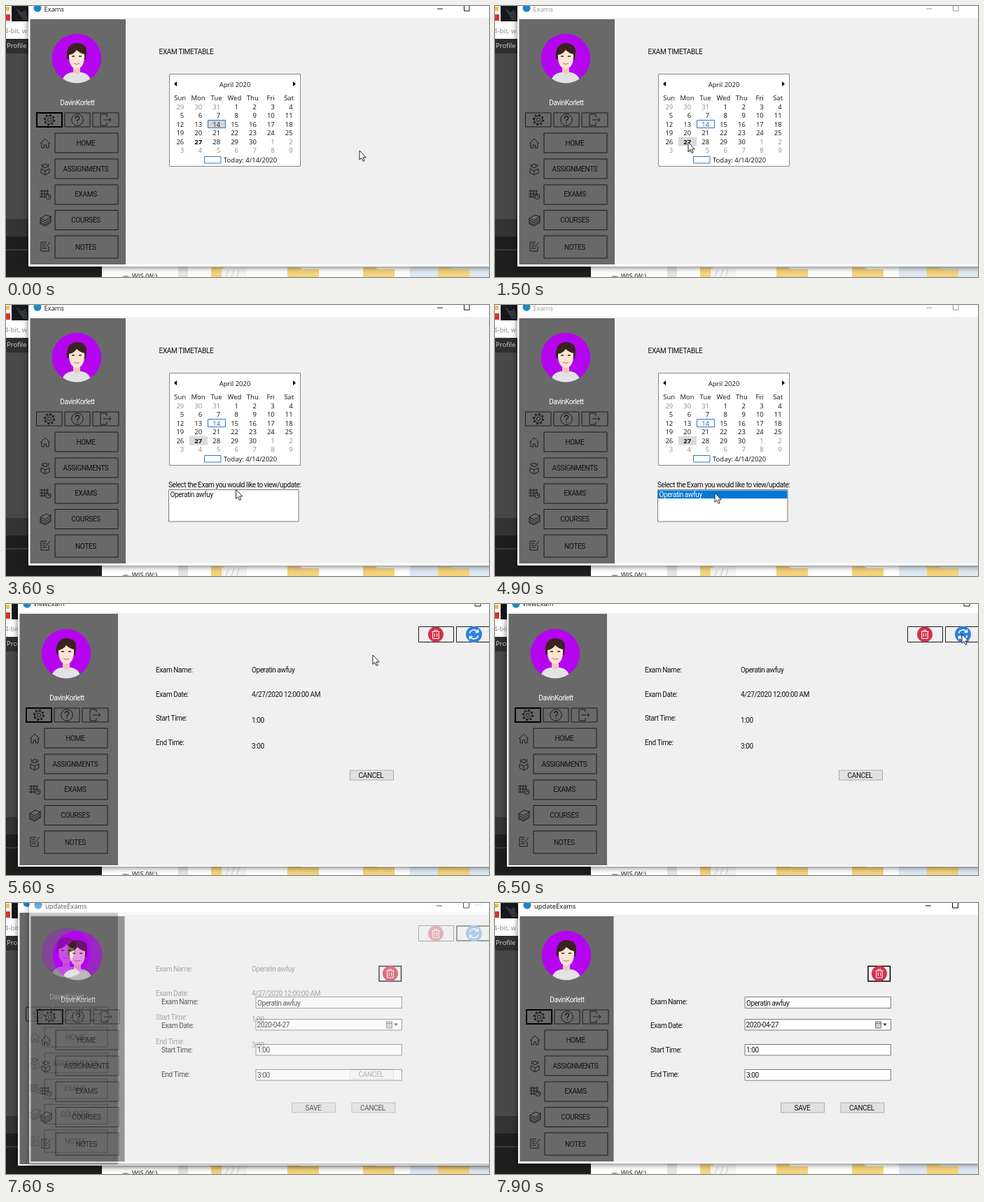
An HTML page that plays this animation: 690 by 388 pixels, repeating every 8 s.

```html
<!DOCTYPE html>
<html lang="en">
<head>
<meta charset="utf-8">
<title>Exam timetable</title>
<style>
  html, body { margin: 0; width: 100%; height: 100%; overflow: hidden; background: #1e1e1e; }
  svg { display: block; width: 100vw; height: 100vh; }
  text { font: 10px Roboto, sans-serif; letter-spacing: -.4px; fill: #111; }
  .ui, .ui text { font: 9.5px "Open Sans", sans-serif; letter-spacing: 0; }
  .caps, .caps text { letter-spacing: -.3px; }
  .mid, .mid text { text-anchor: middle; }
  .line { fill: none; stroke: #1b1b1b; }
  .focus { fill: none; stroke: #000; stroke-width: 2; }
  .button { fill: #e1e1e1; stroke: #adadad; }
  .field { fill: #fff; stroke: #7a7a7a; }
  .blue { fill: none; stroke: #2478c8; }
  .title text { fill: currentColor; font-size: 9.4px; }
  .title path { fill: none; stroke: currentColor; }
  .window { filter: drop-shadow(0 1px 4px #0009); }
</style>
</head>
<body>
<svg viewBox="0 0 690 388" preserveAspectRatio="none">
  <defs>
    <clipPath id="disc"><circle cx="101" cy="75" r="35.5"/></clipPath>
    <path id="folder" d="M0 1h17l4 3h24v12H0z" fill="#f4d37c"/>
    <g id="bin">
      <circle r="11" fill="#d5304b"/>
      <path d="M-5.5 -4h11M-2 -4v-2h4v2M-4.3 -4v10h8.6v-10M-1.7 -1.5v5M1.7 -1.5v5" fill="none" stroke="#fff"/>
    </g>

    <g id="sidebar">
      <g clip-path="url(#disc)">
        <circle cx="101" cy="75" r="35.5" fill="#b505f0"/>
        <path d="M80 112q0-15 14-17h14q13 2 14 17z" fill="#e2e3e4"/>
        <path d="M96 84h10v11q-5 5-10 0z" fill="#efc9b3"/>
        <path d="M87 76q-2-21 13-23q16 0 15 14l-1 10z" fill="#3b2220"/>
        <path d="M90 70q7-1 11-7q5 5 11 6v5q-1 15-11 16q-10-1-11-16z" fill="#fbe4d3"/>
        <path d="M94 72h4M104 72h4" stroke="#3b2220" stroke-width="1.5"/>
        <path d="M97 82q4 3 8 0" fill="none" stroke="#c4605c"/>
      </g>
      <text class="mid" x="102" y="141.5" style="fill:#fff">DavinKorlett</text>
      <g class="line">
        <path d="M43.5 153h36.5v20h-36.5zM84 153h36v20h-36zM124 153h37v20h-37z"/>
        <circle cx="62" cy="163" r="2.6"/><circle cx="62" cy="163" r="5.6"/>
        <circle cx="62" cy="163" r="7.2" stroke-width="2" stroke-dasharray="2.8 2.85"/>
        <circle cx="102" cy="163" r="8.3"/>
        <path d="M99.3 161q0-3 2.7-3t2.7 2.6q0 1.6-2.7 3v1.4M102 166.5v1.5" stroke-width="1.3"/>
        <path d="M144 159v-4h-9v16h9v-4M139 163h11M147 160l3 3l-3 3"/>
        <path d="M49 197l7-7l7 7M51 196v7h3.500v-4h3v4h3.500v-7"/>
        <circle cx="56" cy="229" r="2.8"/>
        <path d="M50 233l6 3l6-3v6l-6 3l-6-3zM56 236v6M52 231q-2-4 0-5M60 231q2-4 0-5"/>
        <path d="M48 265h13M48 269h13M48 273h8M51 263v12M55 263v12M59 263v6"/>
        <circle cx="60.500" cy="273" r="3.500"/><path d="M60.500 271v2h2"/>
        <path d="M49 304l8-5l7 3l-8 5zv3l7 3l8-5M49 307v3l7 3l8-5M49 310v2l7 3l8-5v-10"/>
        <path d="M61 344v7H50v-13h8M52 341h5M52 344h4M52 347h6M57 345l6-7"/>
        <path d="M70 182h90v28H70zM70 219h90v28H70zM70 256h90v28H70zM70 292.500h90v28H70zM70 329h90v32H70z"/>
      </g>
      <g class="mid caps">
        <text x="114" y="199.500">HOME</text><text x="114" y="236.500">ASSIGNMENTS</text>
        <text x="114" y="273">EXAMS</text><text x="114" y="310">COURSES</text>
        <text x="114" y="348.500">NOTES</text>
      </g>
    </g>
  </defs>

  <!-- desktop behind the windows -->
  <rect width="690" height="388" fill="#1e1e1e"/>
  <path d="M0 0h34v47H0z" fill="#fff"/>
  <path d="M8 0h26v22H8z" fill="#16181c"/><path d="M14 3l8 6l6-4l4 15h-8z" fill="#34383f"/>
  <path d="M0 1h5v6H0z" fill="#f2c14a"/><path d="M0 12h6v9H0z" fill="#d8342c"/>
  <path d="M0 47h34v21H0z" fill="#2f2f2f"/><path d="M0 68h34v237H0z" fill="#484848"/>
  <path d="M0 305h34v25H0z" fill="#333"/><path d="M0 348h137v2H0z" fill="#3a3a3a"/>
  <g class="ui">
    <text x="-2" y="38.500" style="fill:#8a8a8a">4-bit, w</text>
    <text x="1" y="60" style="fill:#d8d8d8">Profile</text>
    <path d="M137 370h553v18H137z" fill="#fff"/><path d="M246 370h14v18h-14z" fill="#e3e3e3"/>
    <path d="M577 372h113v16H577z" fill="#dce8f2"/>
    <path d="M165 388q6-4 12 0z" fill="#999"/><text x="180" y="389.500">WIS (W:)</text>
  </g>
  <use href="#folder" x="293" y="373"/><use href="#folder" x="402" y="373"/>
  <use href="#folder" x="510" y="373"/><use href="#folder" x="617" y="373"/>
  <path d="M308 376l36-2v14h-36z" fill="#f4f4f4"/>
  <path d="M314 388l4-10M322 388l4-11M330 388l3-11" stroke="#c9c9c9"/>

  <g id="exams">
    <g class="window">
      <path d="M32 -9h670v382H32z" fill="#fff"/><path d="M34 17h660v353H34z" fill="#f0f0f0"/>
    </g>
    <path d="M34.500 19h136.500v351H34.500z" fill="#696969"/>
    <circle cx="45" cy="3" r="5.500" fill="#1c86c8"/>
    <g class="title ui" id="examsTitle">
      <text x="54.500" y="7.500">Exams</text><path d="M616 4h8M654.500 -1h7.500v8h-7.500z"/>
    </g>
    <use href="#sidebar"/>
    <path id="examsFocus" class="focus" d="M44 153h36v20H44z"/>
    <text class="caps" x="218.500" y="69">EXAM TIMETABLE</text>

    <g class="ui">
      <path d="M233.500 97.500h187v132h-187z" fill="#fff" stroke="#888"/>
      <path d="M244 108v7l-4-3.500zM410 108v7l4-3.500z"/>
      <text class="mid" x="327" y="115.500">April 2020</text>
      <path id="picked" d="M262 188h26v12.500h-26z" fill="#d9d9d9"/>
      <path id="today" class="blue" d="M288.500 163.500h25v11h-25z"/>
      <g id="days"></g>
      <path class="blue" d="M283.500 215.500h23.500v9.500h-23.500z"/>
      <text x="311" y="223.500">Today: 4/14/2020</text>
    </g>

    <g id="list">
      <text x="232" y="260.500">Select the Exam you would like to view/update:</text>
      <path class="field" d="M232.500 264.500h185.500v45.500h-185.500z"/>
      <path id="row" d="M233 265.500h184.500v11.500h-184.500z" fill="#0078d7"/>
      <text id="item" x="234.500" y="275">Operatin awfuy</text>
    </g>

    <g id="dialog" class="ui">
      <path class="window" d="M213 148h335v118H213z" fill="#fff"/>
      <path d="M213 232h335v34H213z" fill="#f0f0f0"/>
      <path d="M213.500 148.500h334v117h-334z" fill="none" stroke="#aaa"/>
      <text x="220" y="164.500" style="font-size:9.200px">Exam Appointment</text>
      <g style="--s:9px" id="message">
        <text x="222" y="201">You already have exams on this date. To add another exam, select No. To</text>
        <text x="222" y="211.500">view the exam/s process Yes.</text>
      </g>
      <path d="M340.500 239.500h59v17h-59z" fill="#cce4f7" stroke="#0078d7"/>
      <path class="button" d="M408.500 239.500h59v17h-59zM475.500 239.500h59v17h-59z"/>
      <g class="mid"><text x="370" y="252">Yes</text><text x="438" y="252">No</text><text x="505" y="252">Cancel</text></g>
    </g>
  </g>

  <g id="view">
    <g class="window">
      <path d="M17 -9h690v385H17z" fill="#fff"/><path d="M19 13h680v361H19z" fill="#f0f0f0"/>
    </g>
    <path d="M19.500 14h140.500v360H19.500z" fill="#696969"/>
    <circle cx="30" cy="0" r="5.500" fill="#1c86c8"/>
    <g class="title ui" id="viewTitle">
      <text x="39" y="3">ViewExam</text><path d="M670 -5h8v8h-8z"/>
    </g>
    <use href="#sidebar" x="-15" y="-4"/>
    <path id="viewFocus" class="focus" d="M29 149h36v20H29z"/>
    <path class="line" d="M589.500 32.500h50v22h-50zM643.500 32.500h50v22h-50z"/>
    <path id="refreshFocus" class="focus" d="M644 33h50v21h-50z"/>
    <use href="#bin" x="614" y="43.500"/>
    <circle cx="668.500" cy="43.500" r="11.500" fill="#2f80e2"/>
    <path d="M662.500 42a6 6 0 0 1 11-2M674.500 45a6 6 0 0 1-11 2M674.500 36.500v4h-4M662.500 50.500v-4h4" fill="none" stroke="#fff" stroke-width="1.600"/>
    <text x="214" y="98">Exam Name:</text><text x="351" y="97.500">Operatin awfuy</text>
    <text x="214" y="132.500">Exam Date:</text><text x="351" y="132.500">4/27/2020 12:00:00 AM</text>
    <text x="214" y="167">Start Time:</text><text x="351" y="169.500">1:00</text>
    <text x="214" y="202">End Time:</text><text x="351" y="207">3:00</text>
    <path class="button" d="M491.500 238h62v14h-62z"/>
    <text class="mid caps" x="521.500" y="249">CANCEL</text>
  </g>

  <g id="update">
    <g class="window">
      <path d="M33 -9h670v382H33z" fill="#fff"/><path d="M35 17h660v353H35z" fill="#f0f0f0"/>
    </g>
    <path d="M35.500 19h134v351H35.500z" fill="#696969"/>
    <circle cx="46" cy="3" r="5.500" fill="#1c86c8"/>
    <g class="title ui">
      <text x="56" y="7.500">updateExams</text><path d="M615 4h8M653.500 -1h8v8h-8z"/>
    </g>
    <use href="#sidebar" x="1"/>
    <path class="focus" d="M45 153h36v20H45z"/>
    <path class="focus" d="M533 90.500h31.500v21.500h-31.500z" style="stroke-width:1.500"/>
    <use href="#bin" x="549" y="101"/>
    <path class="field" d="M357 134.500h208.500v16H357zM357 166.500h208.500v15.500H357zM357 202.500h208.500v15.500H357zM357 238.500h208.500v15.500H357z"/>
    <text x="222" y="144.500">Exam Name:</text><text x="359" y="146.500">Operatin awfuy</text>
    <text x="222" y="179">Exam Date:</text><text x="358.500" y="178">2020-04-27</text>
    <text x="222" y="213.500">Start Time:</text><text x="359" y="214">1:00</text>
    <text x="222" y="248.500">End Time:</text><text x="359" y="250">3:00</text>
    <path d="M543.500 170h8v9h-8zM543.500 172.500h8" fill="#ccd3dc" stroke="#777"/>
    <path d="M554 172.500h6l-3 3.500z" fill="#444"/>
    <path class="button" d="M408.500 286h62v14h-62zM494 286h62v14h-62z"/>
    <g class="mid caps"><text x="439" y="297">SAVE</text><text x="524" y="297">CANCEL</text></g>
  </g>

  <path id="cursor" d="M0 0V13.300L3 10.600L5.200 15.400L7.200 14.500L5.100 9.900H9.300z" fill="#fff" stroke="#111" stroke-width=".9"/>
</svg>

<script>
const $ = id => document.getElementById(id);

for (const line of $('message').children) line.style.cssText = 'font-size:9px;letter-spacing:-.4px';

// Calendar: weekday names, then six weeks starting on 29 March
const column = i => 248.700 + 25.900 * i;
let cells = 'Sun Mon Tue Wed Thu Fri Sat'.split(' ')
  .map((name, i) => `<text class="mid" x="${column(i)}" y="134.500">${name}</text>`).join('');
for (let i = 0; i < 42; i++) {
  const april = i > 2 && i < 33;
  const day = i < 3 ? 29 + i : (i - 3) % 30 + 1;
  const style = `text-anchor:end;fill:${april ? '#111' : '#8c8c8c'}` +
    (april && day === 27 ? ';font-weight:bold' : '');
  cells += `<text ${april ? `id="day${day}"` : ''} style="${style}" x="${column(i % 7) + 5.600}" y="${147.500 + 12.550 * Math.floor(i / 7)}">${day}</text>`;
}
$('days').innerHTML = cells;

// Pointer stops: time, x, y
const stops = [
  [0, 505, 207], [500, 364, 222], [600, 364, 222], [800, 303, 202], [900, 303, 202],
  [1100, 276, 195], [1700, 276, 195], [2400, 370, 250], [3000, 370, 250],
  [3900, 314, 269], [4900, 314, 269], [5600, 524, 73], [6300, 667, 43],
  [6700, 667, 43], [7300, 434, 179], [8000, 434, 179]
];

const ramp = (t, from, to) => Math.min(1, Math.max(0, (t - from) / (to - from)));
const show = (id, on) => { $(id).style.display = on ? '' : 'none'; };
const fade = (id, alpha) => { show(id, alpha > 0); $(id).style.opacity = alpha; };
const activate = (id, on) => { $(id).style.color = on ? '#111' : '#999'; };

function movePointer(t) {
  const next = stops.findIndex(stop => stop[0] > t);
  const [t0, x0, y0] = stops[next - 1], [t1, x1, y1] = stops[next];
  const p = ramp(t, t0, t1), k = p * p * (3 - 2 * p);
  $('cursor').setAttribute('transform', `translate(${x0 + (x1 - x0) * k} ${y0 + (y1 - y0) * k})`);
  show('cursor', t < 7600);
}

function draw(t) {
  const picked = t >= 1300, listed = t >= 3100, chosen = t >= 4800, refreshed = t >= 6600;

  show('exams', t < 5400);
  activate('examsTitle', t < 1400 || t >= 2500 && t < 4900);
  show('examsFocus', !picked);
  show('picked', picked);
  $('today').style.fill = picked ? '#fff' : '#d6d6d6';
  $('day14').style.fill = picked ? '#2b6cb8' : '#222';
  $('day27').style.fill = t >= 1100 && !picked ? '#0066cc' : '#111';
  fade('dialog', ramp(t, 1500, 1700) * (1 - ramp(t, 2500, 2670)));
  show('list', listed);
  show('row', chosen);
  $('item').style.fill = chosen ? '#fff' : '#111';

  fade('view', t < 7700 ? ramp(t, 5000, 5200) : 0);
  activate('viewTitle', t < 7300);
  show('viewFocus', !refreshed);
  show('refreshFocus', refreshed);

  fade('update', ramp(t, 7400, 7700));
  movePointer(t);
}

function tick() {
  draw(Math.floor(performance.now() % 8000 / 100) * 100);
  requestAnimationFrame(tick);
}
tick();
</script>
</body>
</html>
```
